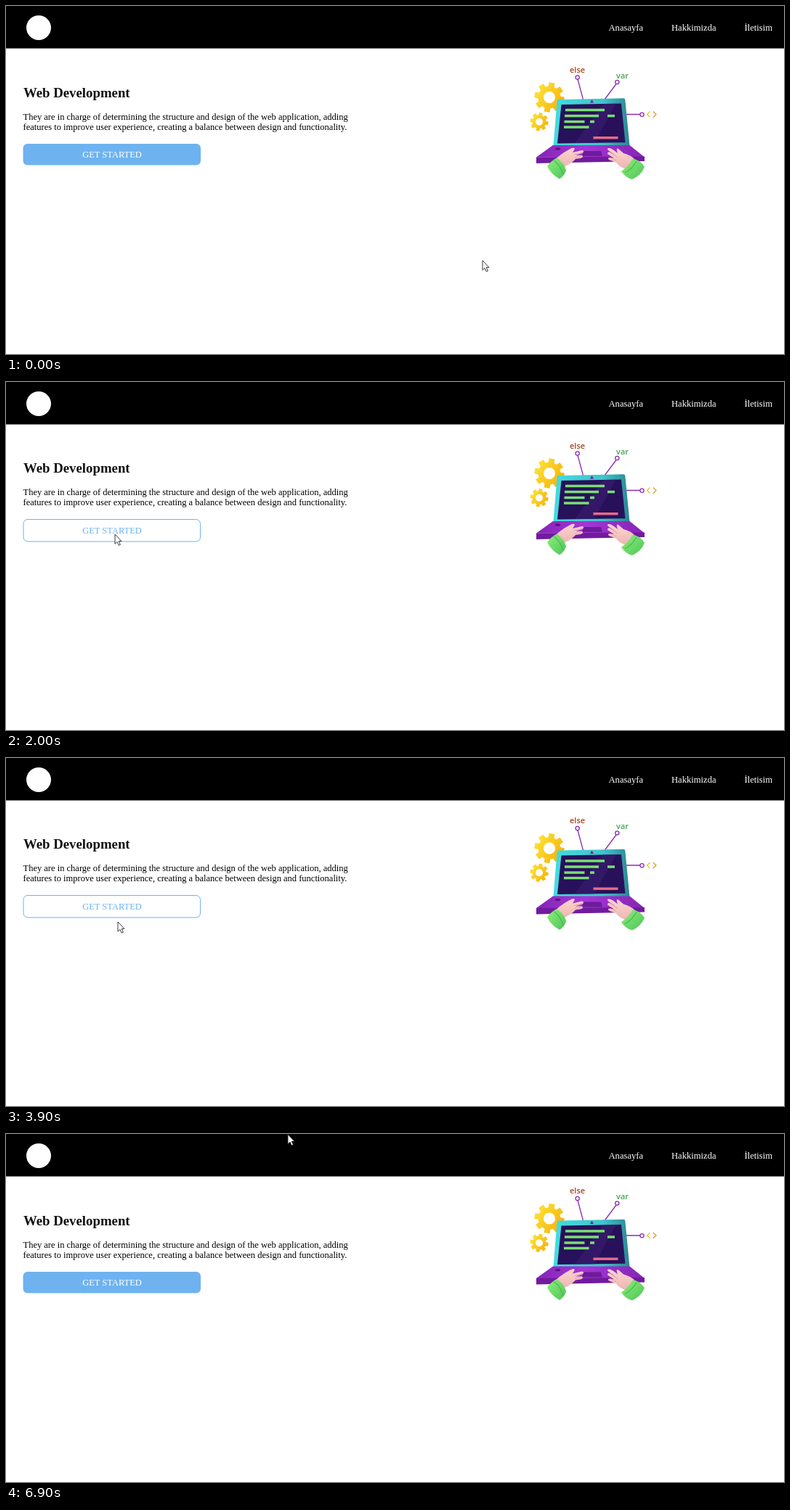
Write an HTML page that moves like this. It is 1071 px wide and 480 px high and loops after 7000 ms.

```html
<!DOCTYPE html>
<html lang="en">
<head>
<meta charset="utf-8">
<title>Web Development</title>
<style>
  html, body { margin: 0; width: 100%; height: 100%; overflow: hidden; background: #fff; }
  svg { display: block; width: 100vw; height: 100vh; }
  text { font: 12.5px "Liberation Serif", "Times New Roman", serif; }
  .nav text { font-size: 12.6px; fill: #fff; }
  .title { font-size: 18.8px; font-weight: bold; }
  .tag { font: 600 11px "Open Sans", sans-serif; }
</style>
</head>
<body>
<svg viewBox="0 0 1071 480" preserveAspectRatio="none">
  <defs>
    <linearGradient id="gold" x2="1" y2=".6">
      <stop stop-color="#ffe93b"/><stop offset="1" stop-color="#f6b40c"/>
    </linearGradient>
    <linearGradient id="lid">
      <stop stop-color="#43dce0"/><stop offset=".65" stop-color="#3fc5cb"/><stop offset="1" stop-color="#2b8793"/>
    </linearGradient>
    <linearGradient id="deck">
      <stop stop-color="#8524b6"/><stop offset=".45" stop-color="#a536d6"/><stop offset="1" stop-color="#8425b4"/>
    </linearGradient>
    <linearGradient id="sleeve" x2="1" y2="1">
      <stop stop-color="#8cf078"/><stop offset="1" stop-color="#4ec45a"/>
    </linearGradient>
    <linearGradient id="skin" x2="0" y2="1">
      <stop stop-color="#fbd5d0"/><stop offset="1" stop-color="#eeb5b2"/>
    </linearGradient>
  </defs>

  <rect width="1071" height="58.5"/>
  <circle cx="45" cy="30" r="17" fill="#fff"/>
  <g class="nav">
    <text x="829.5" y="34">Anasayfa</text>
    <text x="916" y="34">Hakkimizda</text>
    <text x="1016.5" y="34">İletisim</text>
  </g>

  <g id="copy">
    <text class="title" x="24" y="125.5" fill="#111">Web Development</text>
    <text x="23.5" y="157">They are in charge of determining the structure and design of the web application, adding</text>
    <text x="23.5" y="171">features to improve user experience, creating a balance between design and functionality.</text>
  </g>
  <rect id="button" rx="6"/>
  <text id="label" x="146" y="209" text-anchor="middle">GET STARTED</text>

  <g id="art">
    <g fill="url(#gold)" fill-rule="evenodd">
      <path id="bigGear"/>
      <path id="smallGear"/>
    </g>
    <g fill="none" stroke="#8b2bb5" stroke-width="1.3">
      <path d="M787 101L794.500 129M840 107.500L824 129M853 149.500H873"/>
      <g fill="#fff">
        <circle cx="786.700" cy="98.500" r="2.600"/>
        <circle cx="841.300" cy="105" r="2.600"/>
        <circle cx="875.500" cy="149.700" r="2.600"/>
      </g>
    </g>
    <text class="tag" x="776" y="91.500" fill="#a3441c">else</text>
    <text class="tag" x="840" y="99.500" fill="#46a54c">var</text>
    <g fill="none" stroke-width="1.300">
      <path d="M886.500 145.500L882.500 149.500L886.500 153.500" stroke="#efc52e"/>
      <path d="M890.800 145.500L895 149.500L890.800 153.500" stroke="#e39a2b"/>
    </g>

    <path d="M760 129L850 127.300Q852 127.300 852.300 129L858.500 193H753.500L758.500 131Q758.700 129 760 129Z" fill="url(#lid)"/>
    <path d="M764.500 136L847 134.500L852.500 188.300L759 189.500Z" fill="#28105a"/>
    <path d="M822 135L840 134.700L810 189H783Z" fill="#3a1c70" opacity=".65"/>
    <path d="M804 133.500L806.500 129L809 133.500Z" fill="#7d1e91"/>
    <g id="code" fill="#78df72"></g>
    <rect x="808.500" y="180" width="34" height="3.500" fill="#e86a83"/>

    <path d="M753 192H858.500L879 208.500H730Z" fill="url(#deck)"/>
    <path d="M730 208.500L879 207.500V214L730 217Z" fill="#711b9e"/>
    <path d="M796 200H819L821 207H792Z" fill="#6c1c99"/>
    <ellipse cx="759.500" cy="197" rx="3.800" ry="1.800" fill="#5b167f"/>

    <path d="M757 211Q765 203 775 198Q782 193.500 783 197L780 202L793 199Q797 200 793 203L784 206L793 206Q796 208.500 791 210L784 211Q779 217 768 222Z" fill="url(#skin)"/>
    <path d="M782 205L793 202M783 209L791 208" stroke="#dc9d9d" fill="none" stroke-width=".8"/>
    <path d="M745 221Q750 214 758 209.500Q769 217 771 227Q769 234 762 238.500Q750 232 745 221Z" fill="url(#sleeve)"/>
    <path d="M754 213Q764 220 767 233" fill="none" stroke="#47b552" stroke-width="1.200"/>

    <path d="M829 196Q833 195 842 203Q839 195 843 197L850 203Q861 206 866 212L853 225Q843 221 840 216L830 212Q827 209 832 209L837 210L828 204Q828 200 832 202L839 206L829 199Q827 197 829 196Z" fill="url(#skin)"/>
    <path d="M832 202L842 209M832 209L840 213" stroke="#dc9d9d" fill="none" stroke-width=".8"/>
    <path d="M847 228Q857 221 863 210.500Q874 213 879 222Q874 234 862 239Q853 237 847 228Z" fill="url(#sleeve)"/>
    <path d="M852 230Q862 225 868 214" fill="none" stroke="#47b552" stroke-width="1.200"/>
  </g>

  <path id="cursor" d="M0 0V13.300L3 10.500L5.200 15.300L7.400 14.300L5.200 9.600H9Z" fill="#fff" stroke="#25252d" stroke-width=".9"/>
</svg>
<script>
  const LOOP = 7000, STEP = 100, BOB = 2000;
  const BLUE = '#6eb3ef';
  const $ = id => document.getElementById(id);

  const setAttrs = (el, attrs) => {
    for (const key in attrs) el.setAttribute(key, attrs[key]);
  };

  function gear(id, cx, cy, outer, hole) {
    const inner = outer * 0.74, teeth = 8, points = [];
    for (let i = 0; i < teeth; i++) {
      const mid = (i + 0.22) * 2 * Math.PI / teeth;
      for (const [turn, r] of [[-0.27, inner], [-0.19, outer], [0.19, outer], [0.27, inner]]) {
        const a = mid + turn;
        points.push((cx + r * Math.cos(a)).toFixed(2) + ' ' + (cy + r * Math.sin(a)).toFixed(2));
      }
    }
    const ring = `M${cx - hole} ${cy}a${hole} ${hole} 0 1 0 ${2 * hole} 0a${hole} ${hole} 0 1 0 ${-2 * hole} 0Z`;
    $(id).setAttribute('d', `M${points.join('L')}Z${ring}`);
  }

  gear('bigGear', 748, 126, 20.8, 8);
  gear('smallGear', 734, 159.7, 12.8, 5);

  const codeLines = [
    [770, 141.7, 54], [769, 149.8, 47], [828, 149.8, 10],
    [768.5, 157.8, 28], [804, 157.8, 6], [768, 165.3, 34.5]
  ];
  $('code').innerHTML = codeLines
    .map(([x, y, width]) => `<rect x="${x}" y="${y}" width="${width}" height="3.5"/>`).join('');

  // Each row is time, then the values at that time.
  const bobTrack = [
    [0, 0], [180, 1.5], [360, 0], [560, -3], [700, -6.5], [800, -8], [900, -9.5],
    [1200, -16], [1300, -15], [1600, -9], [1800, -3], [1900, -1.5], [2000, 0]
  ];
  const cursorTrack = [
    [0, 656, 351], [100, 650, 348], [400, 510, 286], [800, 290, 206], [900, 258, 208],
    [1100, 240, 224], [1200, 235.5, 237], [1500, 190, 231], [1700, 160, 210],
    [2000, 150, 210], [2200, 148, 242], [2400, 148, 254], [2800, 147.5, 262],
    [3000, 150, 224], [3200, 151, 218], [3400, 152, 239], [3600, 153, 212],
    [3900, 154, 226], [4000, 165, 236], [4300, 300, 254], [4700, 485, 252.5],
    [4900, 400, 247], [5100, 255, 210], [5300, 250, 195], [5500, 330, 110],
    [5700, 398, 40], [5800, 405, 25], [6000, 403, 17], [6400, 388, 0.5], [7000, 388, 0.5]
  ];

  function sample(track, t) {
    const next = Math.max(1, track.findIndex(row => row[0] >= t));
    const a = track[next - 1], b = track[next];
    const k = (t - a[0]) / (b[0] - a[0]);
    return a.slice(1).map((v, i) => v + (b[i + 1] - v) * k);
  }

  function draw(t) {
    const [lift] = sample(bobTrack, t % BOB);
    const [x, y] = sample(cursorTrack, t);
    const hover = x > 23 && x < 268 && y > 189 && y < 228;

    $('art').setAttribute('transform', `translate(0 ${lift})`);
    $('cursor').setAttribute('transform', `translate(${x} ${y})`);
    $('copy').setAttribute('transform', `translate(0 ${hover ? -1 : 0})`);
    setAttrs($('button'), hover
      ? { x: 24, y: 189.5, width: 243.5, height: 30.5, fill: '#fff', stroke: BLUE }
      : { x: 23.5, y: 190, width: 244.5, height: 29.5, fill: BLUE, stroke: 'none' });
    $('label').setAttribute('fill', hover ? BLUE : '#fff');
  }

  const start = performance.now();
  function tick() {
    const t = (performance.now() - start) % LOOP;
    draw(Math.floor(t / STEP) * STEP);
    requestAnimationFrame(tick);
  }
  tick();
</script>
</body>
</html>
```
